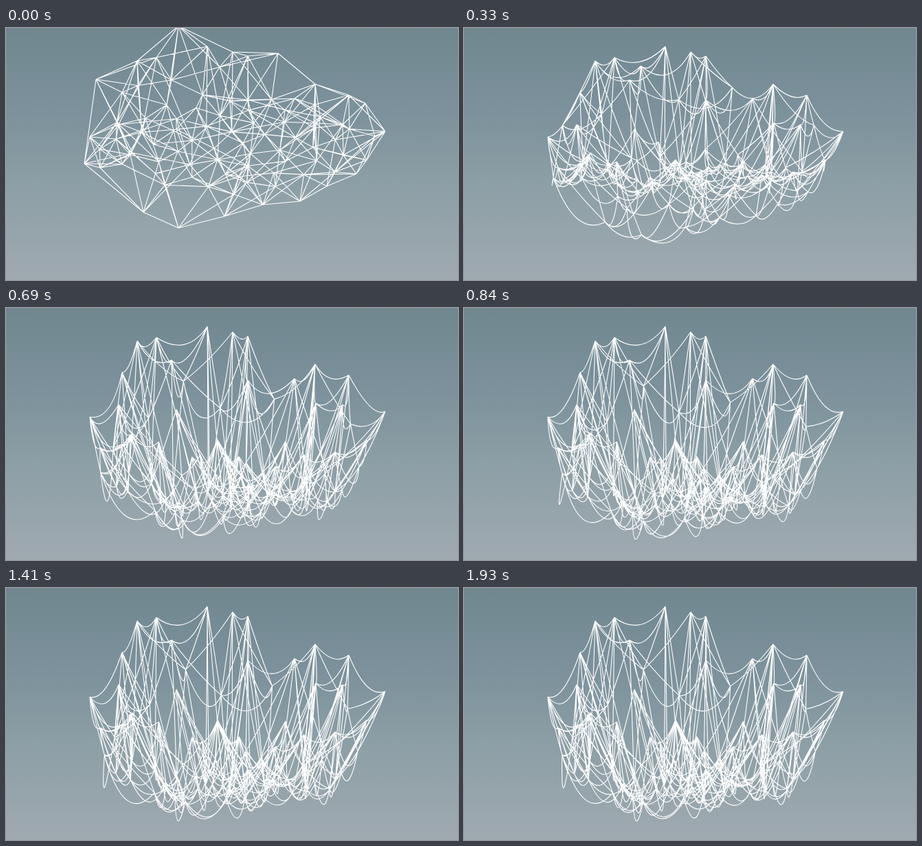
Write an HTML page that moves like this. It is 658 px wide and 368 px high and loops after 3240 ms.

```html
<!DOCTYPE html>
<html lang="en">
<head>
<meta charset="utf-8">
<title>Falling net</title>
<style>
  html, body { margin: 0; width: 100%; height: 100%; overflow: hidden; }
  body { background: linear-gradient(#708790, #7d929c 35%, #8d9fa6 62%, #9faab0); }
  svg { display: block; width: 100%; height: 100%; }
  path { fill: none; stroke: #fff; stroke-width: 1.1; stroke-linejoin: round; }
</style>
</head>
<body>
<svg viewBox="0 0 658 368"><path id="net"/></svg>
<script>
const LOOP = 3240, START = 90, STEP = 36.8, STEPS = 50;
const CENTRE = 330, INNER = 54, NEIGHBOURS = 6, DEPTH = 130, SLACK = 1.15;

let seed = 2024;
const rnd = () => (seed = (seed * 16807) % 2147483647) / 2147483647;
const settle = (rate, s) => 1 - (1 + rate * s) * Math.exp(-rate * s);

// Bowl that the loose knots sink towards
const bowl = x => 159 + 160 * Math.sqrt(Math.max(0, 1 - ((x - CENTRE) / 215) ** 4));

// Fixed skyline on both sides of the gap, and fixed peaks below it
const leftRidge = [[122,159], [169,94], [191,48], [219,43], [293,27]];
const rightRidge = [[330,35], [352,41], [352,105], [420,103], [450,82], [499,98], [552,151]];
const peaks = [[241,76], [164,141], [248,148], [451,139], [490,141], [181,185], [137,204], [339,217], [525,193]];
// Loose knots: the upper ones and the lower border
const crest = [[251,-3], [311,57], [396,37], [192,84], [523,110]];
const hem = [[537,158], [510,213], [467,231], [428,253], [374,258], [318,275], [251,292], [200,269], [114,198], [131,75]];

const knots = [], ropes = new Map();

// sink: 0 is fixed, 1 falls all the way to the bowl
function knot([x0, y0], sink, ridge = false) {
  const x1 = sink ? CENTRE + (x0 - CENTRE) * 0.87 : x0;
  const y1 = y0 + sink * Math.max(0, bowl(x1) - y0);
  const rim = Math.hypot((x0 - CENTRE) / 225, (y0 - 150) / 150);
  const z = (rnd() - 0.5) * DEPTH * Math.sqrt(Math.max(0.1, 1 - rim * rim));
  const p = { id: knots.length, x0, y0, x1, y1, z, ridge, sway: sink * (4 + 5 * rnd()), phase: rnd() * 6.28 };
  knots.push(p);
  return p;
}

const distance = (a, b) => Math.hypot(a.x0 - b.x0, a.y0 - b.y0, a.z - b.z);

function tie(a, b) {
  const key = Math.min(a.id, b.id) + "-" + Math.max(a.id, b.id);
  if (!ropes.has(key)) ropes.set(key, { a, b, length: SLACK * distance(a, b), phase: rnd() * 6.28 });
}

const chain = list => list.slice(1).forEach((p, i) => tie(list[i], p));

chain(leftRidge.map(p => knot(p, 0, true)));
chain(rightRidge.map(p => knot(p, 0, true)));
chain(hem.map(p => knot(p, 0.7)));
peaks.forEach(p => knot(p, 0));
crest.forEach(p => knot(p, 0.38));

for (let i = 0; i < INNER; i++) {
  const angle = i * 2.4, r = Math.sqrt((i + rnd()) / INNER);
  const x = 325 + 195 * r * Math.cos(angle), y = 168 + 75 * r * Math.sin(angle);
  const fixed = y > 180 && rnd() < 0.45;
  knot([x, y], fixed ? 0 : 0.5 + 0.45 * rnd());
}

for (const a of knots) {
  knots
    .filter(b => b !== a && !(a.ridge && b.ridge))
    .map(b => ({ b, d: distance(a, b) * (0.65 + 0.7 * rnd()) }))
    .sort((p, q) => p.d - q.d)
    .slice(0, NEIGHBOURS)
    .forEach(({ b }) => tie(a, b));
}

const net = document.getElementById("net");
const f = n => n.toFixed(1);

function draw(ms) {
  const k = ms < START ? 0 : Math.min(STEPS, Math.floor((ms - START) / STEP)) + 1;
  const s = k * STEP / 1000;
  const fall = settle(6.2, s), droop = settle(11, s);
  const swing = droop * Math.exp(-0.7 * s);

  for (const p of knots) {
    const turn = 11 * s + p.phase;
    p.x = p.x0 + (p.x1 - p.x0) * fall + p.sway * swing * Math.sin(turn);
    p.y = p.y0 + (p.y1 - p.y0) * fall + p.sway * swing * Math.cos(turn) / 2;
  }

  let d = "";
  for (const { a, b, length, phase } of ropes.values()) {
    const span = Math.hypot(a.x - b.x, a.y - b.y, a.z - b.z);
    const sag = 0.43 * droop * Math.sqrt(Math.max(90, length * length - span * span));
    const cx = (a.x + b.x) / 2 + 0.6 * sag * swing * Math.sin(11.5 * s + phase);
    const cy = (a.y + b.y) / 2 + 2 * sag;
    d += `M${f(a.x)} ${f(a.y)}Q${f(cx)} ${f(cy)} ${f(b.x)} ${f(b.y)}`;
  }
  net.setAttribute("d", d);
}

const origin = performance.now();
function tick() {
  draw((performance.now() - origin) % LOOP);
  requestAnimationFrame(tick);
}
tick();
</script>
</body>
</html>
```
